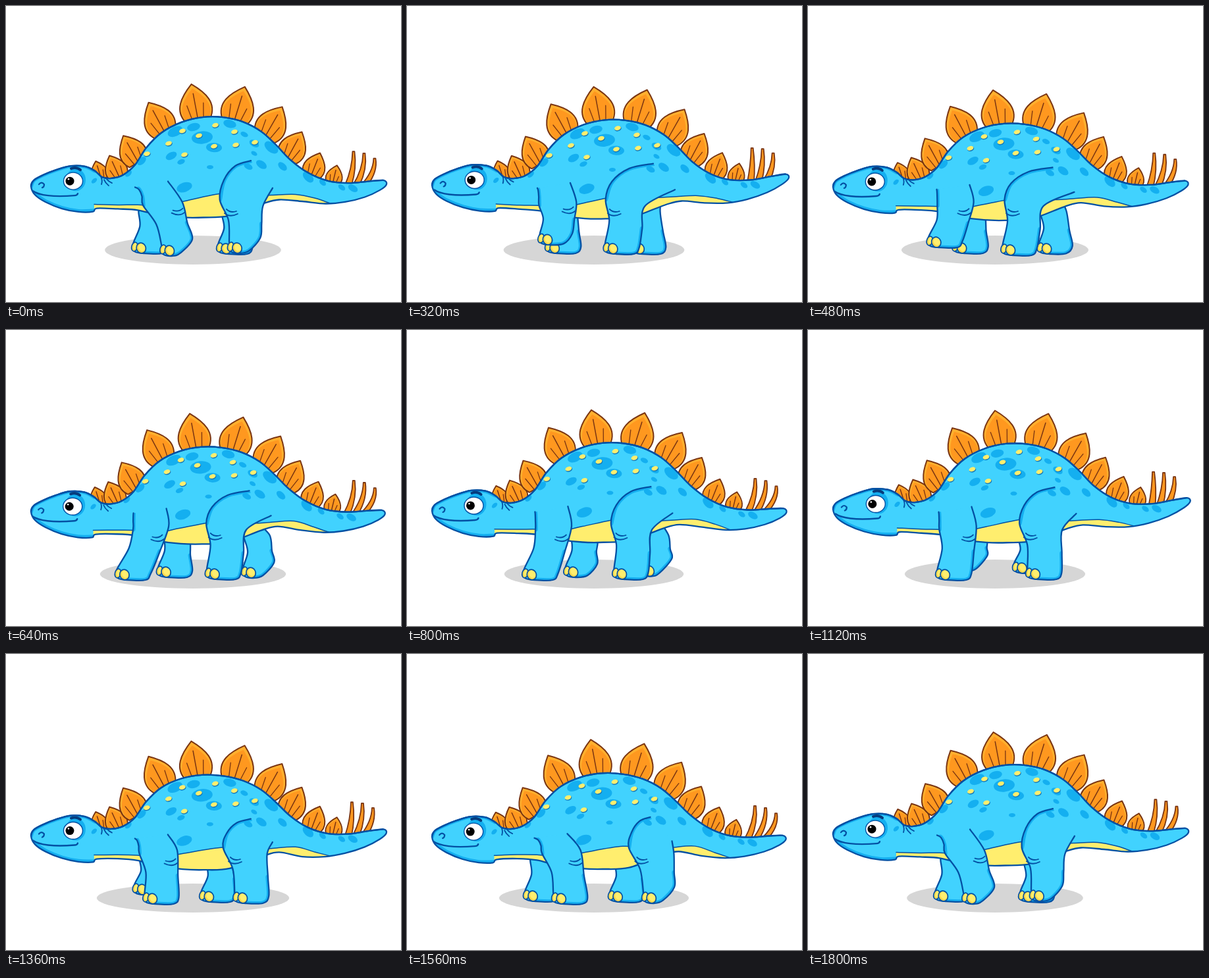
An HTML page with a canvas for the animation above (1.84 s loop, 600 by 450 pixels).

```html
<!DOCTYPE html>
<html lang="en">
<head>
<meta charset="utf-8">
<title>Walking dinosaur</title>
<style>
html, body { margin: 0; width: 100%; height: 100%; overflow: hidden; background: #fff; }
canvas { display: block; width: 600px; height: 450px; }
</style>
</head>
<body>
<canvas id="stage" width="600" height="450"></canvas>
<script>
const ctx = document.getElementById('stage').getContext('2d');
const LOOP = 1840, STEP = 40, STRIDE = 1800, SWING = 580;
const BLUE = '#41d2fe', SHADE = '#14aff0', LINE = '#0350a3', YELLOW = '#ffee6e';
const ORANGE = '#ff981f', LIGHT = '#ffb02e', BROWN = '#7a3512';
const TAU = Math.PI * 2;

const { sin, cos, max, min, exp } = Math;
const clamp = v => max(0, min(1, v));
const pairs = a => a.flatMap((v, i) => i % 2 ? [] : [[v, a[i + 1]]]);

// Key points of the trunk at rest
const BACK = pairs([
  38, 272, 42, 263, 56, 255, 76, 247, 98, 241, 120, 242, 135, 249, 146, 259, 160, 261,
  178, 256, 196, 241, 213, 215, 236, 192, 266, 176, 298, 168, 330, 168, 360, 175,
  388, 190, 410, 210, 432, 233, 458, 252, 488, 264, 520, 267, 550, 264, 573, 262]);
const UNDER = pairs([
  578, 268, 568, 277, 545, 288, 515, 296, 485, 299, 450, 296, 415, 294, 390, 300, 340, 318,
  300, 321, 268, 321, 230, 317, 200, 310, 170, 308, 138, 306]);
const JAW = pairs([132, 311, 110, 311, 85, 306, 60, 296, 44, 285]);
const BELLY = pairs([134, 300, 170, 302, 200, 302, 235, 304, 268, 297, 330, 284, 375, 288,
  403, 287, 440, 286, 470, 291, 494, 299]);
const PLATES = [145, 173, 201, 242, 292, 346, 393, 427, 463, 496];
// x, y, size
const SPOTS = [
  285, 183, 10, 298, 199, 16, 316, 214, 12, 340, 178, 10, 257, 190, 12, 362, 194, 6,
  377, 208, 8, 403, 214, 12, 388, 240, 9, 368, 243, 7, 420, 243, 8, 251, 227, 9, 266, 236, 6,
  310, 244, 5, 377, 223, 5, 206, 235, 8, 186, 254, 6, 271, 275, 12, 459, 259, 10, 481, 267, 6,
  510, 274, 6, 527, 275, 8, 134, 264, 5];
const FRECKLES = pairs([268, 189, 318, 180, 347, 190, 293, 196, 316, 212, 349, 210, 378, 206,
  247, 208, 271, 225, 214, 224]);

// start: moment the foot leaves the ground; follow: how far knee and back go with the foot
const LEGS = {
  nearFront: { start: 60, mid: 212, ground: 371, lift: 17, hip: [196, 275], rump: [246, 266],
    knee: [201, 303], back: [258, 298], follow: [.22, .3] },
  nearHind: { start: 1640, mid: 336, ground: 370, lift: 4, hip: [372, 234], rump: [405, 276],
    knee: [318, 294], back: [382, 304], follow: [.6, .75] },
  farFront: { start: 960, mid: 222, ground: 367, lift: 12, hip: [215, 290], rump: [250, 290],
    knee: [222, 313], back: [260, 314], follow: [1, 1] },
  farHind: { start: 740, mid: 338, ground: 368, lift: 8, hip: [335, 290], rump: [385, 288],
    knee: [335, 318], back: [375, 312], follow: [.9, .85] }
};

const bob = t => 15.5 * sin(Math.PI * (t - 80) / 900) ** 2 - 3 * sin(TAU * t / STRIDE);
const tail = t => -9.5 * sin(TAU * (t - 40) / 900);

// The trunk sinks most above the hips, the head follows late, the tail waves
const makeWarp = t => (x, y) => {
  const sink = (.32 + .68 * exp(-(((x - 350) / 130) ** 2))) * bob(t - 100 * clamp((200 - x) / 100));
  const low = x > 140 && x < 450 ? .55 * clamp((y - 230) / 70) : 0;
  return [x + 2.5 * sin(TAU * t / 900) * clamp((x - 60) / 120),
    y + sink * (1 - low) + tail(t) * clamp((x - 440) / 137)];
};

function backHeight(x) {
  const i = BACK.findIndex(p => p[0] >= x), [a, b] = [BACK[i - 1], BACK[i]];
  return a[1] + (b[1] - a[1]) * (x - a[0]) / (b[0] - a[0]);
}

function curve(p, closed) {
  const n = p.length, path = new Path2D();
  const at = i => closed ? p[(i + n) % n] : p[max(0, min(n - 1, i))];
  path.moveTo(...p[0]);
  for (let i = 0; i < (closed ? n : n - 1); i++) {
    const [a, b, c, d] = [-1, 0, 1, 2].map(k => at(i + k));
    path.bezierCurveTo(b[0] + (c[0] - a[0]) / 6, b[1] + (c[1] - a[1]) / 6,
      c[0] - (d[0] - b[0]) / 6, c[1] - (d[1] - b[1]) / 6, c[0], c[1]);
  }
  return path;
}

function fill(path, color) { ctx.fillStyle = color; ctx.fill(path); }
function stroke(path, color = LINE, width = 2.3) {
  ctx.strokeStyle = color;
  ctx.lineWidth = width;
  ctx.stroke(path);
}
function line(d, color = LINE, width = 1.8) { stroke(new Path2D(d), color, width); }
function oval(x, y, rx, ry, tilt = 0) {
  const p = new Path2D();
  p.ellipse(x, y, rx, ry, tilt, 0, TAU);
  return p;
}
function inside(path, paint) {
  ctx.save();
  ctx.clip(path);
  paint();
  ctx.restore();
}

function drawPlate(x0, i, warp) {
  const d = x0 - 312, lean = .0095 * d * exp(-((d / 130) ** 2));
  const size = 29 + 28 * sin(Math.PI * i / (PLATES.length - 1)), y0 = backHeight(x0) + 4;
  const [x, y] = warp(x0, y0);
  const [tx, ty] = warp(x0 + size * sin(lean), y0 - size * cos(lean));
  const h = Math.hypot(tx - x, ty - y), w = size * .9;
  const leaf = k => {
    const a = w * k, b = h * k;
    return new Path2D(`M${-.36 * a} 0C${-.66 * a} ${-.38 * b} ${-.36 * a} ${-.72 * b} 0 ${-b}
      C${.36 * a} ${-.72 * b} ${.66 * a} ${-.38 * b} ${.36 * a} 0Z`);
  };
  ctx.save();
  ctx.translate(x, y);
  ctx.rotate(Math.atan2(tx - x, y - ty));
  fill(leaf(1), LIGHT);
  fill(leaf(.88), ORANGE);
  line(`M0 0V${-h * .74}`, BROWN, 1.5);
  for (const s of [-1, 1]) line(`M${s * w * .16} 0L${s * w * .25} ${-h * .45}`, BROWN, 1.3);
  stroke(leaf(1), BROWN, 2);
  ctx.restore();
}

function drawSpike(i, warp, lean) {
  const [x, y] = warp(520 + 12 * i, 270), [px, py] = warp(527 + 16 * i, 219 + 2.5 * i * i);
  const tx = px + lean, my = (y + py) / 2;
  const p = new Path2D(`M${x - 5} ${y}Q${tx - 2} ${my} ${tx - 1.5} ${py}
    L${tx + 1.5} ${py}Q${tx + 5} ${my} ${x + 5} ${y}Z`);
  fill(p, ORANGE);
  stroke(p, BROWN, 1.8);
}

function drawToes(x, y) {
  for (const [dx, dy, rx, ry, tilt] of [[-6, -1, 4.5, 7, .25], [4, 1, 7, 8, -.4]]) {
    const nail = oval(x + dx, y + dy, rx, ry, tilt);
    fill(nail, '#fbd94f');
    fill(oval(x + dx + 1, y + dy - 1, rx - 2, ry - 2, tilt), YELLOW);
    stroke(nail, LINE, 1.7);
  }
}

// Where the toes are, and how far the heel is rolled up
function foot(leg, t) {
  let u = ((t - leg.start) % STRIDE + STRIDE) % STRIDE / SWING;
  const rest = STRIDE / SWING;
  const x = u < 1 ? 36 - 72 * u * (1.35 - .35 * u) : -36 + 72 * (u - 1) / (rest - 1);
  const y = u < 1 ? -leg.lift * sin(Math.PI * u) : 0;
  if (u > rest - .5) u -= rest;
  const angle = min(1, Math.abs(u - .05) / .55) * Math.PI / 2;
  return { x, y, roll: cos(angle) };
}

function wrinkle([x, y], dir) {
  line(`M${x} ${y}q${8 * dir} 7 ${20 * dir} 1m${-17 * dir} -7q${6 * dir} 6 ${15 * dir} 3`);
}

function drawLeg(leg, t, warp, creased) {
  const { x: dx, y: dy, roll } = foot(leg, t);
  const x = leg.mid + dx, y = leg.ground + dy;
  const knee = [leg.knee[0] + leg.follow[0] * dx, leg.knee[1]];
  const back = [leg.back[0] + leg.follow[1] * dx, leg.back[1]];
  const hip = warp(...leg.hip), rump = warp(...leg.rump);
  const thigh = [0, 1, 2, 3].map(i => {
    const a = i * Math.PI / 6;
    return [hip[0] + (knee[0] - hip[0]) * sin(a), knee[1] + (hip[1] - knee[1]) * cos(a)];
  });
  const shin = [(knee[0] + x - 8) / 2 + 6, (knee[1] + y) / 2 - 5];
  const heel = [x + 44 - 6 * roll, y - 1 - 17 * roll];
  const ankle = [(heel[0] + back[0]) / 2, (heel[1] + back[1]) / 2 + 3];
  const sole = [[x + 8, y + 9], [x + 36 - 17 * roll, y + 9 - 5 * roll], heel, ankle];
  const path = curve([...thigh, shin, [x - 8, y - 6], [x - 6, y + 6], ...sole, back, rump]);
  fill(path, BLUE);
  inside(path, () => {
    stroke(curve(sole), SHADE, 7);
    if (creased) stroke(curve(thigh), SHADE, 7);
  });
  stroke(path);
  drawToes(x, y);
  if (creased === 'knee') wrinkle([knee[0] + (shin[0] - knee[0]) * .55, knee[1] + 21], 1);
  if (creased === 'back') wrinkle([(ankle[0] + back[0]) / 2, (ankle[1] + back[1]) / 2], -1);
}

function drawFace(warp) {
  const [x, y] = warp(100, 200);
  ctx.save();
  ctx.translate(x - 100, y - 200);
  fill(oval(106, 262, 15, 17), SHADE);
  const eye = oval(102, 264, 14.5, 13);
  fill(eye, '#fff');
  stroke(eye, LINE, 1.4);
  fill(oval(97, 264, 6.5, 6.5), '#000');
  fill(oval(95, 261, 1.3, 1.3), '#fff');
  line('M99 245Q107 242 113 247', '#063b7d', 4);
  line('M41 279Q48 284 64 286T104 286Q108 286 109 283', LINE, 2.4);
  line('M50 269Q54 264 58 269Q58 273 55 274', LINE, 2.2);
  line('M144 257Q147 263 145 269M149 262Q151 267 156 271M153 261Q156 265 161 267');
  ctx.restore();
}

function draw(t) {
  const warp = makeWarp(t), bent = list => list.map(p => warp(...p));
  const body = curve(bent([...BACK, ...UNDER, ...JAW]), true);
  ctx.fillStyle = '#fff';
  ctx.fillRect(0, 0, 600, 450);
  ctx.lineJoin = ctx.lineCap = 'round';

  fill(oval(284, 371, 133 + .75 * bob(t), 22), '#d6d6d6');
  drawLeg(LEGS.farHind, t, warp);
  drawLeg(LEGS.farFront, t, warp);
  for (let i = 0; i < 3; i++) drawSpike(i, warp, -.4 + .5 * tail(t));
  PLATES.forEach((x, i) => drawPlate(x, i, warp));

  fill(body, BLUE);
  inside(body, () => {
    stroke(curve(bent(JAW)), SHADE, 8);
    stroke(curve(bent(BACK.slice(0, 7))), SHADE, 6);
    const edge = curve(bent(BELLY)), belly = new Path2D(edge);
    belly.lineTo(494, 360);
    belly.lineTo(134, 360);
    fill(belly, YELLOW);
    stroke(edge, LINE, 1.5);
  });
  stroke(body);

  drawLeg(LEGS.nearHind, t, warp, 'knee');
  drawLeg(LEGS.nearFront, t, warp, 'back');

  inside(body, () => {
    for (let i = 0; i < SPOTS.length; i += 3) {
      const [x, y, r] = SPOTS.slice(i, i + 3);
      fill(oval(...warp(x, y), r, r * .6, .8 * sin((x - 310) / 90)), SHADE);
    }
  });
  for (const [x, y] of bent(FRECKLES)) {
    fill(oval(x + .6, y + 1, 5.3, 3.6, -.3), '#1678b8');
    fill(oval(x, y, 5, 3.2, -.3), YELLOW);
  }
  stroke(curve(bent(BACK)));
  drawFace(warp);
}

function tick() {
  draw(Math.floor(performance.now() % LOOP / STEP) * STEP);
  requestAnimationFrame(tick);
}
tick();
</script>
</body>
</html>
```
